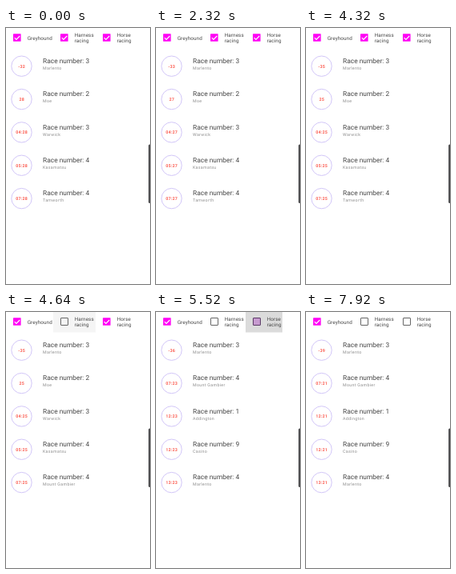
Animation of 180x320 px, one loop 8000 ms. Source, as an HTML page with a canvas:

```html
<!DOCTYPE html>
<html lang="en">
<head>
<meta charset="utf-8">
<title>Next races</title>
<style>
  html, body { margin: 0; width: 100%; height: 100%; overflow: hidden; background: #fff; }
  canvas { display: block; width: 180px; height: 320px; }
</style>
</head>
<body>
<canvas id="stage"></canvas>
<script>
const W = 180, H = 320, LOOP = 8000, STEP = 80;
const ROW = 41.35;
const canvas = document.getElementById('stage');
const ctx = canvas.getContext('2d');
const dpr = window.devicePixelRatio || 1;
canvas.width = W * dpr;
canvas.height = H * dpr;
ctx.scale(dpr, dpr);
ctx.textRendering = 'geometricPrecision';

// Moments at which the countdowns lose a second
const firstTicks = [1360, 2800, 3680, 4720, 5760, 6720, 7680];
const lateTicks = [6160, 7200];

// levels: ripple opacity per step after the press
const filters = [
  { x: 9, label: ['Greyhound'], press: Infinity },
  { x: 68, label: ['Harness', 'racing'], press: 4480, left: 59, right: 112, levels: [.1, .13, .04] },
  { x: 121, label: ['Horse', 'racing'], press: 5440, left: 112, right: 158, levels: [.08, .14, .13, .06] }
];

const allRaces = [
  [3, 'Marlento', -32], [2, 'Moe', 28], [3, 'Warwick', 268],
  [4, 'Kasamatsu', 328], [4, 'Tamworth', 448]
];
const noHarness = [...allRaces.slice(0, 4), [4, 'Mount Gambier', 448]];
const greyhounds = [
  [3, 'Marlento', -32], [4, 'Mount Gambier', 443], [1, 'Addington', 743],
  [9, 'Casino', 743], [4, 'Marlento', 803]
];

const passed = (ticks, t) => ticks.filter(k => t >= k).length;

function clock(s) {
  if (s < 60) return String(s);
  const pad = n => String(n).padStart(2, '0');
  return pad(Math.floor(s / 60)) + ':' + pad(s % 60);
}

function text(str, x, y, size, color, { weight = 400, gap = 0, align = 'left' } = {}) {
  ctx.font = `${weight} ${size}px Roboto, sans-serif`;
  ctx.letterSpacing = gap + 'px';
  ctx.textAlign = align;
  ctx.fillStyle = color;
  ctx.fillText(str, x, y);
}

function box(x, y, size, fill, stroke) {
  ctx.beginPath();
  ctx.roundRect(x, y, size, size, .5);
  if (fill) {
    ctx.fillStyle = fill;
    ctx.fill();
  }
  if (stroke) {
    ctx.strokeStyle = stroke;
    ctx.lineWidth = 1;
    ctx.stroke();
  }
}

function checkbox(x, state) {
  const y = 7.2;
  if (state === 'on') {
    box(x, y, 9.6, '#ff00f5');
    ctx.strokeStyle = '#fff';
    ctx.lineWidth = 1.1;
    ctx.beginPath();
    ctx.moveTo(x + 1.7, y + 5);
    ctx.lineTo(x + 3.9, y + 7.2);
    ctx.lineTo(x + 8.2, y + 2.8);
    ctx.stroke();
  } else if (state === 'mid') {
    box(x + .5, y + .3, 9, '#c79bd0', '#5b3a66');
  } else {
    box(x + .5, y + .3, 9, null, '#666');
  }
}

function drawFilter(f, t) {
  const n = Math.floor((t - f.press) / STEP);
  if (n >= 0 && n < f.levels.length) {
    ctx.fillStyle = `rgba(0,0,0,${f.levels[n]})`;
    ctx.fillRect(f.left, 0, f.right - f.left, 25.5);
  }
  checkbox(f.x, n < 1 ? 'on' : n === 1 ? 'mid' : 'off');
  const top = f.label.length > 1 ? 10.6 : 14.6;
  f.label.forEach((s, i) =>
    text(s, f.x + 17.7, top + i * 7.7, 6.3, '#484848', { gap: .1 }));
}

function drawRace([number, place, start], i, ticks) {
  const y = i * ROW;
  ctx.beginPath();
  ctx.arc(19.5, 47.7 + y, 12.7, 0, Math.PI * 2);
  ctx.strokeStyle = '#d2c6f8';
  ctx.lineWidth = 1;
  ctx.stroke();
  text(clock(start - ticks), 19.7, 49.7 + y, 5.3, '#fb5c50',
    { weight: 700, gap: .22, align: 'center' });
  text('Race number: ' + number, 46, 43.9 + y, 8.35, '#454545', { gap: .03 });
  text(place, 46, 51.8 + y, 5.26, '#8c8c8c', { gap: .33 });
}

function draw(t) {
  ctx.fillStyle = '#fff';
  ctx.fillRect(0, 0, W, H);
  filters.forEach(f => drawFilter(f, t));

  const refreshed = t >= 5440;
  const races = refreshed ? greyhounds : t >= 4560 ? noHarness : allRaces;
  const first = passed(firstTicks, t);
  races.forEach((race, i) =>
    drawRace(race, i, refreshed && i ? passed(lateTicks, t) : first));

  ctx.fillStyle = '#444446';
  ctx.beginPath();
  ctx.roundRect(178.2, 145.5, 4, 73.5, 1.5);
  ctx.fill();
}

const origin = performance.now();
function loop() {
  draw((performance.now() - origin) % LOOP);
  requestAnimationFrame(loop);
}
loop();
</script>
</body>
</html>
```
